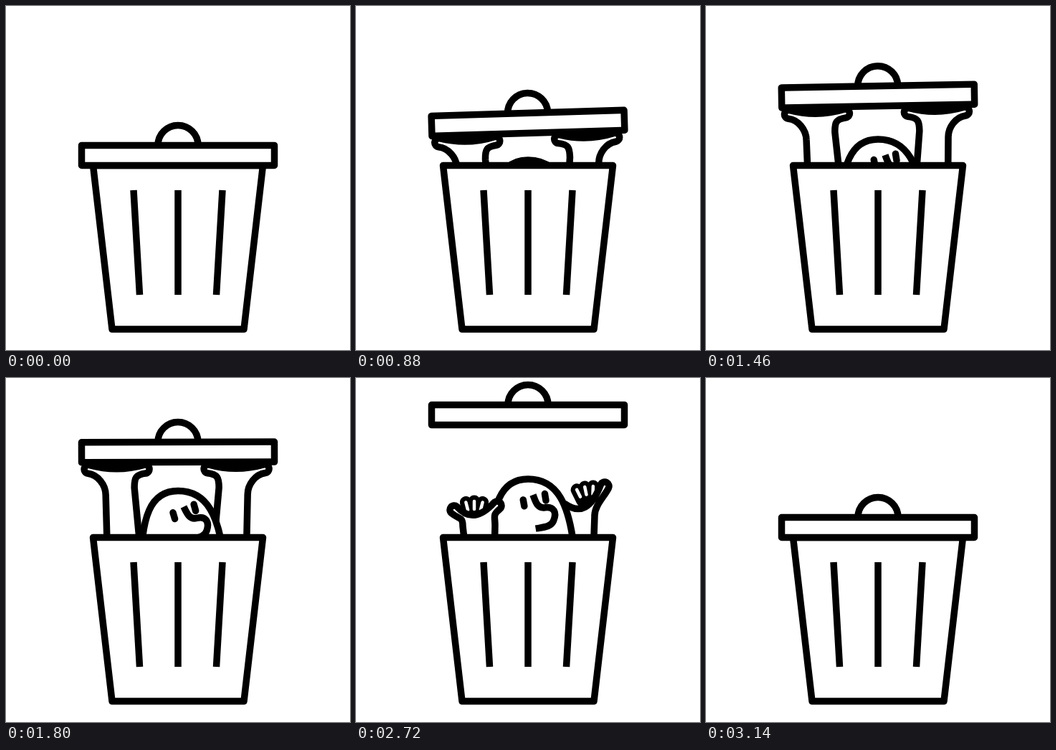
An HTML page with a canvas that plays this animation: 480x480 px, repeating every 5400 ms.

```html
<!DOCTYPE html>
<html lang="en">
<head>
<meta charset="utf-8">
<title>Bin</title>
<style>
html, body { margin: 0; width: 100%; height: 100%; overflow: hidden; background: #fff; }
canvas { display: block; width: 100vw; height: 100vh; }
</style>
</head>
<body>
<canvas id="c" width="480" height="480"></canvas>
<script>
const ctx = document.getElementById('c').getContext('2d');
const LOOP = 5400, LINE = 9.5, REACH = 118, TIP = 6;
const UP = 2000, BLINK = 2260, THROW = 2460, PEAK = 2720, LAND = 3037, END = 3140;

// Arm poses, drawn as a left arm; each side has a finger tip, a wrist and a foot.
// palm bends the top edge, fan is the root and angle of the raised fingers.
const hold = {
  outer: { tip: [115, 114], wrist: [139, 150], foot: [142, 270] },
  inner: { tip: [194, 114], wrist: [179, 140], foot: [191, 270] },
  palm: [155, 119], fan: [155, 132, 0]
};
const waveLeft = {
  outer: { tip: [137, 184], wrist: [149, 207], foot: [154, 250] },
  inner: { tip: [197, 178], wrist: [194, 206], foot: [193, 250] },
  palm: [164, 206], fan: [165, 219, 0]
};
const waveRight = {
  outer: { tip: [129, 151], wrist: [143, 192], foot: [145, 250] },
  inner: { tip: [187, 181], wrist: [191, 205], foot: [191, 250] },
  palm: [153, 198], fan: [147, 198, 0.21]
};

const clamp = v => Math.max(0, Math.min(1, v));
const span = (t, a, b) => clamp((t - a) / (b - a));
const smooth = k => k * k * (3 - 2 * k);

function mix(a, b, k) {
  if (typeof a === 'number') return a + (b - a) * k;
  const out = Array.isArray(a) ? [] : {};
  for (const key in a) out[key] = mix(a[key], b[key], k);
  return out;
}

// Linear track through [time, value] pairs
function track(keys, t) {
  const i = keys.findIndex(key => key[0] > t);
  if (i < 0) return keys[keys.length - 1][1];
  const [t0, v0] = keys[i - 1], [t1, v1] = keys[i];
  return mix(v0, v1, span(t, t0, t1));
}

function pose(t) {
  let lift, degrees = -1.8 * Math.sin(Math.PI * span(t, 0, UP)) ** 2;
  if (t > PEAK) degrees = -5 * span(t, PEAK, 3000) * (1 - span(t, 3000, END));
  const tilt = degrees * Math.PI / 180;

  if (t < THROW) {
    lift = track([[0, 0], [280, 6], [560, 19], [880, 45], [UP, REACH]], t);
  } else if (t < PEAK) {
    lift = REACH + 39 * (1 - (1 - span(t, THROW, PEAK)) ** 2);
  } else {
    const fall = 157 * (1 - span(t, PEAK, LAND) ** 2);
    lift = Math.max(fall, 137 * Math.sin(Math.abs(tilt)));
  }

  const free = smooth(span(t, THROW, 2680));
  const look = smooth(span(t, 1460, UP));
  return {
    tilt, lift, free,
    head: track([[0, REACH], [880, 74], [1460, 45], [UP, 0]], t),
    duck: 120 * span(t, 2740, 2990) ** 2,
    turn: Math.PI / 20 * (1 - look + free),
    faceX: 3 * (1 - look),
    glance: t < BLINK ? -2 : 0
  };
}

function ink(path, fill) {
  if (fill) {
    ctx.fillStyle = '#fff';
    ctx.fill(path);
  }
  ctx.lineWidth = LINE;
  ctx.strokeStyle = '#000';
  ctx.stroke(path);
}

// Turns around the lid's centre
function withLid(p, draw) {
  ctx.save();
  ctx.translate(240, 208.5 - p.lift);
  ctx.rotate(p.tilt);
  ctx.translate(-240, -208.5);
  draw();
  ctx.restore();
}

function fingers([x, y, angle]) {
  ctx.lineCap = 'round';
  for (const [width, color, root] of [[17, '#000', 30], [4.5, '#fff', 36]]) {
    ctx.lineWidth = width;
    ctx.strokeStyle = color;
    for (let i = -1; i <= 1; i++) {
      const a = angle + i * 0.25, dx = Math.sin(a), dy = -Math.cos(a);
      ctx.beginPath();
      ctx.moveTo(x + dx * root, y + dy * root);
      ctx.lineTo(x + dx * 47, y + dy * 47);
      ctx.stroke();
    }
  }
}

// Lower and upper edge points of one finger tip, and the bend towards the wrist
function prong({ tip, wrist }, palm, side) {
  const a = Math.atan2(tip[1] - palm[1], tip[0] - palm[0]);
  const nx = -Math.sin(a) * side * TIP, ny = Math.cos(a) * side * TIP;
  const low = [tip[0] + nx, tip[1] + ny];
  return {
    low, angle: a,
    high: [tip[0] - nx, tip[1] - ny],
    bend: [low[0] - Math.cos(a) * 14, low[1] - Math.sin(a) * 14],
    rise: [wrist[0], wrist[1] - 14]
  };
}

function arm({ outer, inner, palm, fan }) {
  const o = prong(outer, palm, -1), i = prong(inner, palm, 1);
  const path = new Path2D(), quarter = Math.PI / 2;
  path.moveTo(...outer.foot);
  path.lineTo(...outer.wrist);
  path.bezierCurveTo(...o.rise, ...o.bend, ...o.low);
  path.arc(...outer.tip, TIP, o.angle - quarter, o.angle + quarter);
  path.quadraticCurveTo(...palm, ...i.high);
  path.arc(...inner.tip, TIP, i.angle - quarter, i.angle + quarter);
  path.bezierCurveTo(...i.bend, ...i.rise, ...inner.wrist);
  path.lineTo(...inner.foot);
  fingers(fan);
  ink(path, true);
}

function placedArm(wave, mirrored, p) {
  const draw = () => {
    ctx.translate(0, p.free ? p.duck : REACH);
    if (mirrored) ctx.transform(-1, 0, 0, 1, 476, 0);
    arm(mix(hold, wave, p.free));
  };
  if (!p.free) return withLid(p, draw);
  ctx.save();
  draw();
  ctx.restore();
}

const skull = new Path2D('M188 240C190 180 200 141 240 141C282 141 297 178 304 235');
const nose = new Path2D('M247 163C252 172 256 181 266 178C278 174 284 182 281 194C279 203 270 205 258 209');
const eyes = new Path2D('M234.5 172L237.5 180.5M263 159L266 168');

function head(p) {
  ctx.save();
  ctx.translate(0, p.head + p.duck);
  ink(skull, true);
  ctx.translate(247 + p.faceX, 163);
  ctx.rotate(p.turn);
  ctx.translate(-247, -163);
  ctx.lineCap = 'butt';
  ink(nose);
  ctx.lineCap = 'round';
  ctx.translate(p.glance, 0);
  ink(eyes);
  ctx.restore();
}

const can = new Path2D('M121.5 222.5H358.5L332 451H148Z');
const slats = new Path2D('M178 257L186.5 403M240 257V403M302 257L293.5 403');
const knob = new Path2D('M212 194.5A28 28 0 0 1 268 194.5');
const plate = new Path2D('M105.5 194.5H374.5V222.5H105.5Z');

function draw(t) {
  const p = pose(t);
  ctx.fillStyle = '#fff';
  ctx.fillRect(0, 0, 480, 480);
  ctx.lineJoin = 'round';

  if (t < LAND) {
    ctx.save();
    ctx.beginPath();
    ctx.rect(0, 0, 480, 222);
    ctx.clip();
    placedArm(waveRight, true, p);
    head(p);
    placedArm(waveLeft, false, p);
    ctx.restore();
  }

  ink(can, true);
  ctx.lineCap = 'butt';
  ink(slats);
  ctx.lineCap = 'round';
  withLid(p, () => {
    ink(knob, true);
    ink(plate, true);
  });
}

const start = performance.now();
function tick() {
  draw((performance.now() - start) % LOOP);
  requestAnimationFrame(tick);
}
tick();
</script>
</body>
</html>
```
